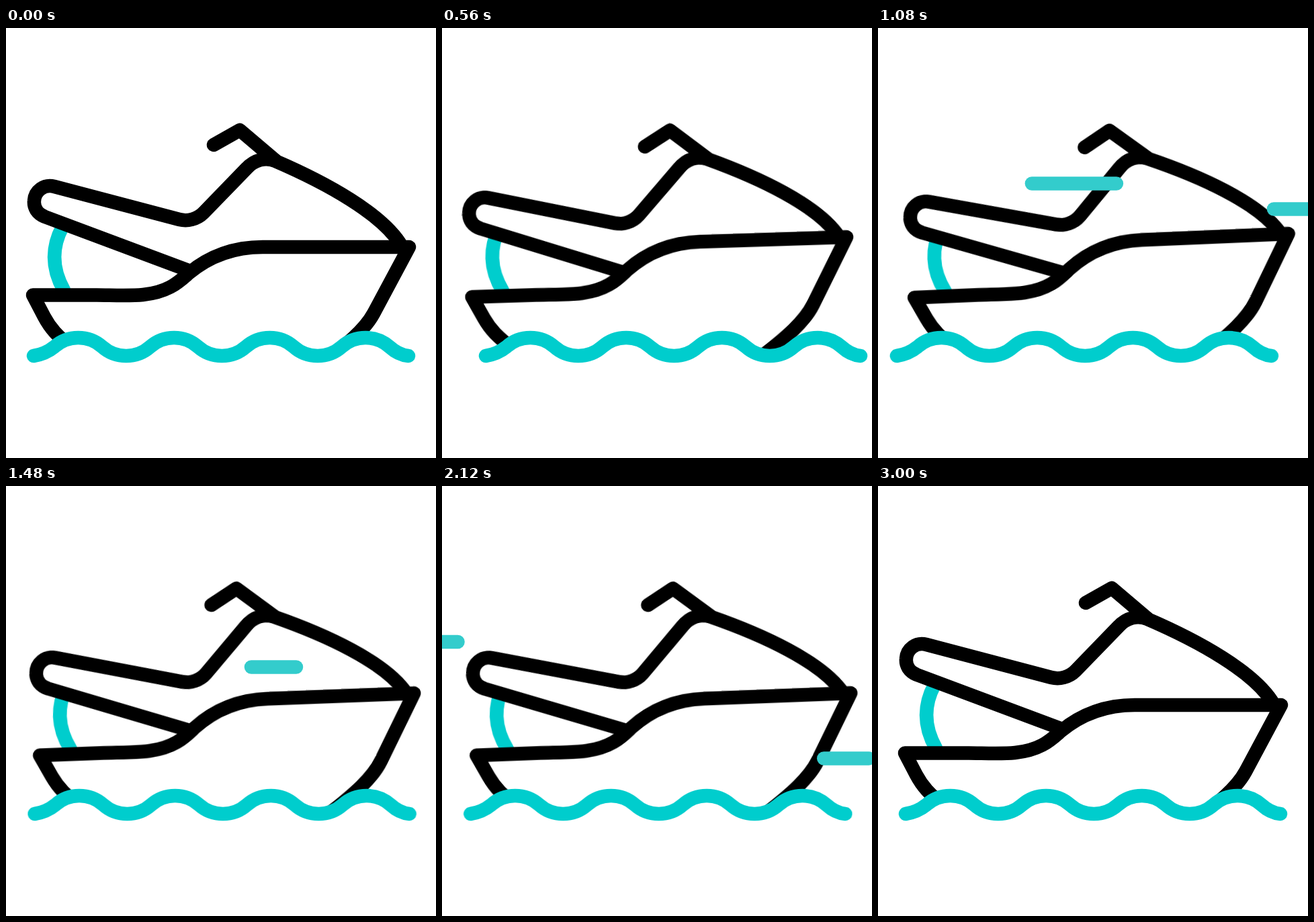
Write an HTML page that moves like this. It is 640 by 640 pixels and loops after 4000 ms.

```html
<!DOCTYPE html>
<html lang="en">
<head>
<meta charset="utf-8">
<title>Jet ski</title>
<style>
  html, body { margin: 0; width: 100%; height: 100%; overflow: hidden; background: #fff; }
  svg { display: block; width: 100vw; height: 100vh; }
  path { fill: none; stroke-width: 20.5; stroke-linecap: round; stroke-linejoin: round; }

  .hull, .body, .sea { animation: 4s cubic-bezier(.37, 0, .63, 1) infinite; }
  .hull { transform-origin: 130px 385px; animation-name: hull; }
  .body { transform-origin: 348px 360px; animation-name: body; }
  .sea { animation-name: sea; }

  .black { stroke: #000; }
  .shell { fill: #fff; }
  .aqua { stroke: #00cdcd; }
  .water { fill: #fff; }

  /* One dash travels along each line; the gap fills the rest of the loop. */
  .streak {
    --span: 3720px;
    stroke: #3cc;
    stroke-dasharray: var(--len) calc(var(--span) - var(--len));
    animation: streak 4s linear calc(var(--start) - 4s) infinite;
  }
  .slow { --span: 2240px; --len: 67px; }

  @keyframes streak {
    from { stroke-dashoffset: var(--len); }
    to { stroke-dashoffset: calc(var(--len) - var(--span)); }
  }
  @keyframes sea {
    0%, 75%, 100% { transform: translateX(0); }
    15%, 45% { transform: translateX(24.2px); }
    30%, 60% { transform: translateX(-17px); }
  }
  @keyframes hull {
    0%, 75%, 100% { transform: translateX(0) rotate(0deg); }
    15% { transform: translateX(4.2px) rotate(-1.83deg); }
    30% { transform: translateX(14.5px) rotate(-2.48deg); }
    45% { transform: translateX(3.9px) rotate(-1.73deg); }
    60% { transform: translateX(16.4px) rotate(-2.53deg); }
  }
  @keyframes body {
    0%, 75%, 100% { transform: translateX(0) rotate(0deg); }
    15% { transform: translateX(4px) rotate(-3.5deg); }
    30% { transform: translateX(14.3px) rotate(-4.75deg); }
    45% { transform: translateX(3.7px) rotate(-3.15deg); }
    60% { transform: translateX(16.2px) rotate(-4.85deg); }
  }
</style>
</head>
<body>
<svg viewBox="0 0 640 640">
  <path class="hull aqua" d="M84 296C68 326 68 358 86 390"/>

  <g class="body">
    <path class="black shell" d="M272 361L58 281C46 276 41 267 42 257C43 242 57 232 72 236L258 285C270 288 284 285 294 275L358 209C370 196 386 192 401 198C480 232 557 276 586 320"/>
    <path class="black" d="M309 174L348 152L401 197"/>
  </g>

  <path class="hull black shell" d="M466 501C507 472 534 449 547 425L600 326H382C340 326 302 340 272 365C258 377 243 393 204 397C184 399 155 397.5 135 397.5H40L57 430C66 447 76 458 100 478"/>

  <g class="sea">
    <path class="water" d="M41 488C54 486 64 481 72 474.5c20-18 51-18 71.25 0s51 18 71.25 0s51-18 71.25 0s51 18 71.25 0s51-18 71.25 0s51 18 71.25 0s51-18 71.25 0C579 482 588 487 599 488V600H41Z"/>
    <path class="aqua" d="M41 488C54 486 64 481 72 474.5c20-18 51-18 71.25 0s51 18 71.25 0s51-18 71.25 0s51 18 71.25 0s51-18 71.25 0s51 18 71.25 0s51-18 71.25 0C579 482 588 487 599 488"/>
  </g>

  <path class="streak" style="--start:10ms;--len:100px" d="M420 231.5H22"/>
  <path class="streak" style="--start:654ms;--len:126px" d="M626 231.5H37"/>
  <path class="streak slow" style="--start:972ms" d="M650 269.5H220"/>
  <path class="streak" style="--start:1484ms;--len:126px" d="M490 232H-30"/>
  <path class="streak slow" style="--start:1975ms" d="M650 405.5H220"/>
  <path class="streak" style="--start:2176ms;--len:156px" d="M626 119.5H37"/>
</svg>
</body>
</html>
```
